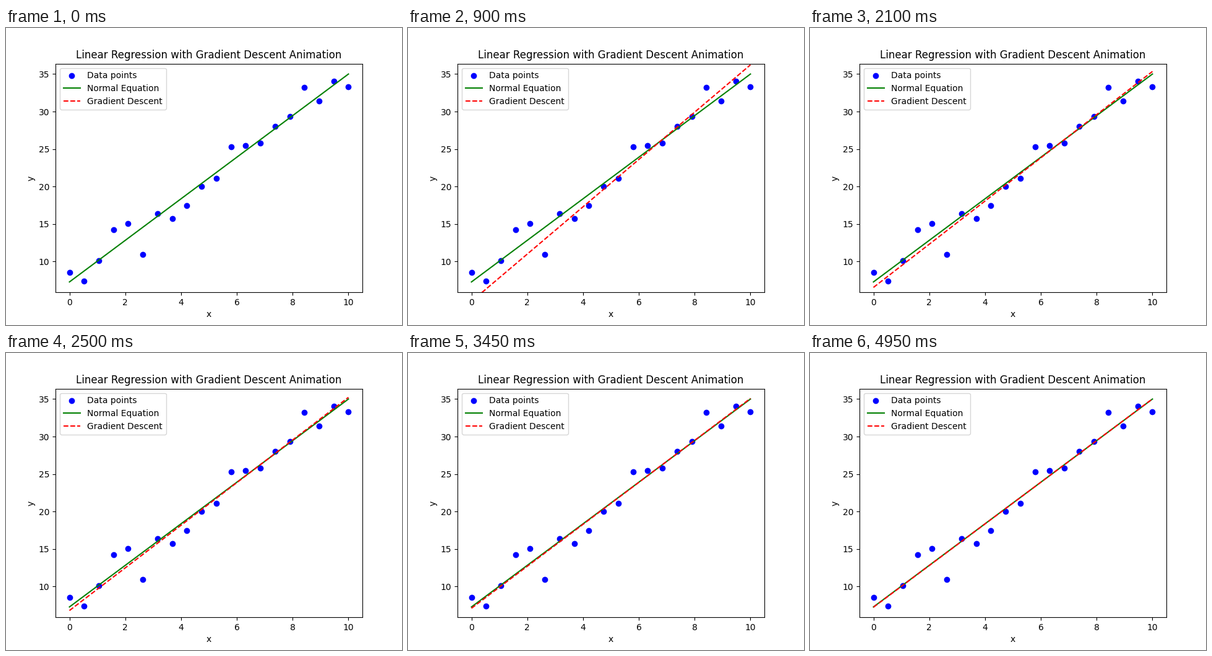
Write a matplotlib script that moves like this. It is 640 px wide and 480 px high and loops after 5000 ms.

```python
import numpy as np
import matplotlib.pyplot as plt
from matplotlib.animation import FuncAnimation

FRAMES = 100
INTERVAL = 50
STEPS_PER_FRAME = 10
RATE = 0.01

# Noisy samples around y = 5 + 3x
np.random.seed(0)
x = np.linspace(0, 10, 20)
y = 5 + 3 * x + 2 * np.random.randn(x.size)

X = np.column_stack([np.ones_like(x), x])
best = np.linalg.solve(X.T @ X, X.T @ y)


def descend(theta, steps):
    for _ in range(steps):
        theta = theta - RATE * 2 / x.size * X.T @ (X @ theta - y)
    return theta


# Parameters reached at each frame, starting from zero
path = [np.zeros(2)]
for _ in range(FRAMES - 1):
    path.append(descend(path[-1], STEPS_PER_FRAME))

fig, ax = plt.subplots(figsize=(6.4, 4.8), dpi=100)
ax.scatter(x, y, color="blue", label="Data points")
ax.plot(x, X @ best, color="green", label="Normal Equation")
fit_line, = ax.plot([], [], color="red", linestyle="--", label="Gradient Descent")
ax.set_title("Linear Regression with Gradient Descent Animation")
ax.set_xlabel("x")
ax.set_ylabel("y")
ax.legend(loc="upper left")

# Keep the limits set by the data while the fit moves
ax.set_xlim(ax.get_xlim())
ax.set_ylim(ax.get_ylim())


def update(frame):
    fit_line.set_data(x, X @ path[frame])
    return fit_line,


anim = FuncAnimation(fig, update, frames=FRAMES, interval=INTERVAL,
                     repeat=True, repeat_delay=0, blit=False)
plt.show()
```
